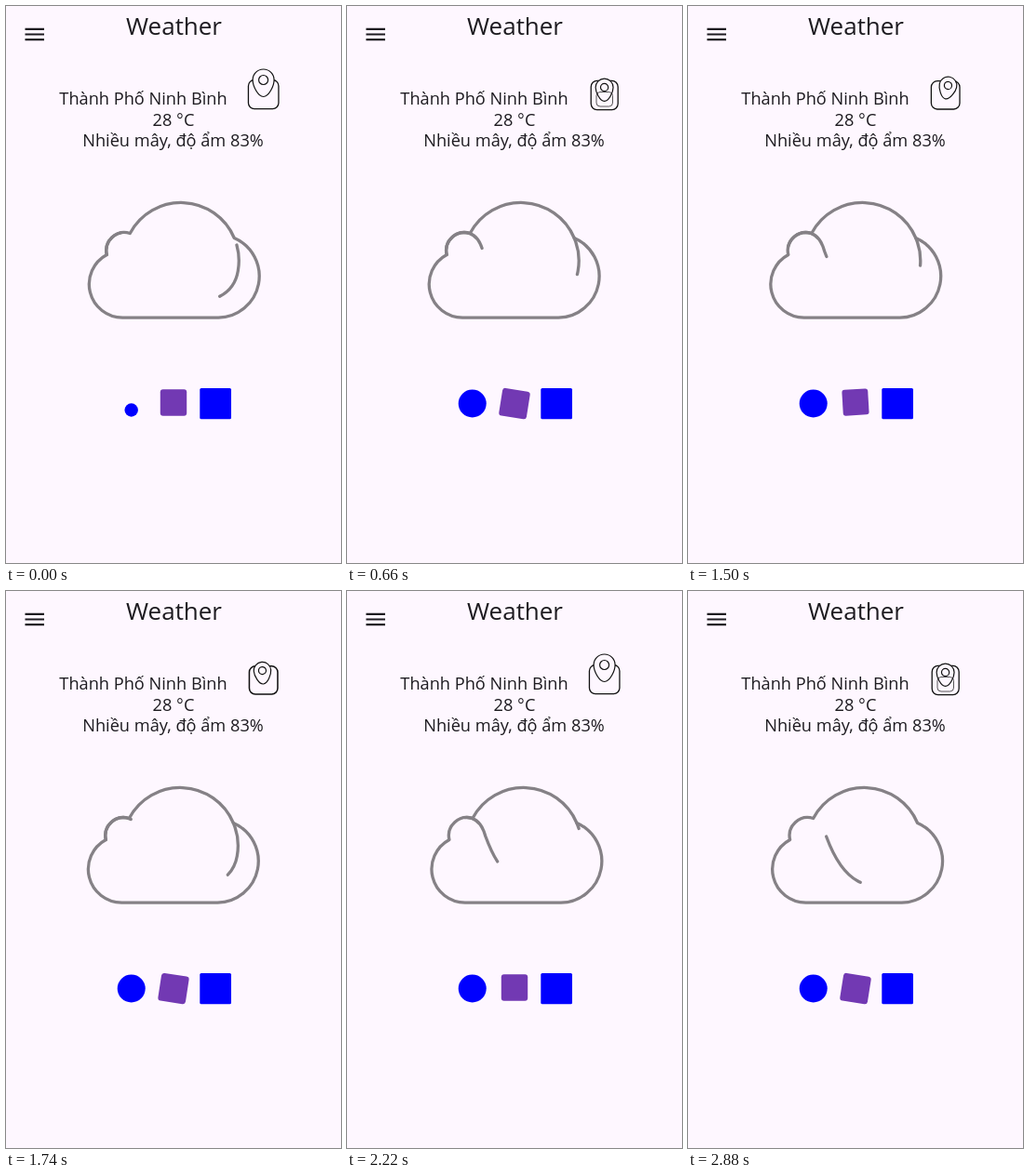
An HTML page that plays this animation: 360x599 px, repeating every 2940 ms.

```html
<!DOCTYPE html>
<html lang="vi">
<head>
<meta charset="utf-8">
<title>Weather</title>
<style>
html, body { margin: 0; width: 100%; height: 100%; overflow: hidden; background: #fef7ff; }
svg { display: block; }
text { font: 18.2px "Open Sans", "Noto Sans", sans-serif; fill: #1d1b20; text-anchor: middle; }
.title { font-size: 26px; font-weight: 500; }
.cloud { fill: none; stroke: #858186; stroke-width: 3.3; stroke-linecap: round; stroke-linejoin: round; }
.pin { fill: #fef7ff; stroke: #111; stroke-width: 1.2; }
</style>
</head>
<body>
<svg width="360" height="599" viewBox="0 0 360 599">
  <path d="M20.5 24.8H41M20.5 30.5H41M20.5 36.2H41" stroke="#1d1b20" stroke-width="2.2"/>
  <text class="title" x="180.5" y="31">Weather</text>
  <text x="147.5" y="106">Thành Phố Ninh Bình</text>
  <text x="180" y="129">28 °C</text>
  <text x="179.5" y="151">Nhiều mây, độ ẩm 83%</text>

  <g class="pin">
    <rect id="base" rx="6.5"/>
    <g id="pin">
      <path vector-effect="non-scaling-stroke" d="M-11.5-18A11.5 11.5 0 0 1 11.5-18C11.5-12 6 0 0 0S-11.5-12-11.5-18Z"/>
      <circle vector-effect="non-scaling-stroke" cy="-18" r="5"/>
    </g>
    <rect id="inner" x="268" y="92.5" width="17.5" height="15.5" rx="4" fill="none" stroke-width=".8"/>
  </g>

  <g id="cloud" class="cloud">
    <path d="M133 244.5A62 62 0 0 1 245 249.5A44.7 44.7 0 0 1 228 335.2H125A36 36 0 0 1 108 267.5A19.5 19.5 0 0 1 133 244.5Z"/>
    <path id="swirl" stroke-dasharray="63 145" d="M245 249.5A62 62 0 0 1 249 285C247 297 240 307 229 312.5C214 320 196 320 181 312C164 303 154 283 147 264C144 253 139 244 127 243.5A19.5 19.5 0 0 0 108 267.5"/>
  </g>

  <circle id="dot" cx="134.7" fill="#00f"/>
  <rect id="tile" x="-14.5" y="-14.5" width="29" height="29" rx="3" fill="#7239b3"/>
  <rect x="208.3" y="411" width="33.7" height="33.3" rx="1.5" fill="#00f"/>
</svg>
<script>
const LOOP = 2940, STEP = 60;
const { sin, cos, min, max, sqrt, PI } = Math;
const set = (id, attrs) => {
  for (const k in attrs) document.getElementById(id).setAttribute(k, attrs[k]);
};
const smooth = x => x * x * (3 - 2 * x);

// The pin drops into its base once, then leans right and left.
function drawPin(t) {
  const hop = 1140, period = 2220, p = t % period;
  const u = (p - hop) / (period - hop), leaning = u > 0;
  const drop = leaning ? 0 : sin(PI * p / hop) ** 4;
  const squash = leaning ? sqrt(sin(PI * u)) : 0;
  const lean = leaning ? sin(2 * PI * u) : 0;
  const width = 32.5 - 4 * drop - 2 * squash;
  set("pin", {
    transform: `translate(276.6 ${97.5 + 5.5 * drop + 2.5 * squash}) rotate(${13 * lean}) scale(${1 - .2 * (drop + squash)})`
  });
  set("base", {
    x: 276.7 - width / 2, y: 79.5 + drop + 1.3 * squash, width, height: 31.2 - squash,
    "stroke-width": 1.3 + .7 * max(0, -lean)
  });
  set("inner", { opacity: drop });
}

// A dash drifts along the inner curve with one quick burst per period.
function drawCloud(t) {
  const p = t % 920 / 920;
  const head = 71 + 110 * p + 98 * smooth(min(1, p * 7));
  set("cloud", { transform: `translate(${.7 + 1.7 * cos(2 * PI * (p - .29))} 0)` });
  set("swirl", { "stroke-dashoffset": 63 - head });
}

function drawIcons(t) {
  const grow = min(1, (t + 120) % 2090 / 250);
  set("dot", { cy: 441 - 13.5 * grow, r: 15 * grow });

  const swing = min(1, t % 1110 / 888);
  const angle = -9 * sin(2 * PI * swing);
  set("tile", {
    transform: `translate(180 ${426.5 + .12 * angle}) rotate(${angle}) scale(${.98 + .006 * angle})`
  });
}

const start = performance.now();
function tick() {
  const elapsed = (performance.now() - start) % LOOP;
  const t = Math.floor(elapsed / STEP) * STEP;
  drawPin(t);
  drawCloud(t);
  drawIcons(t);
  requestAnimationFrame(tick);
}
tick();
</script>
</body>
</html>
```
